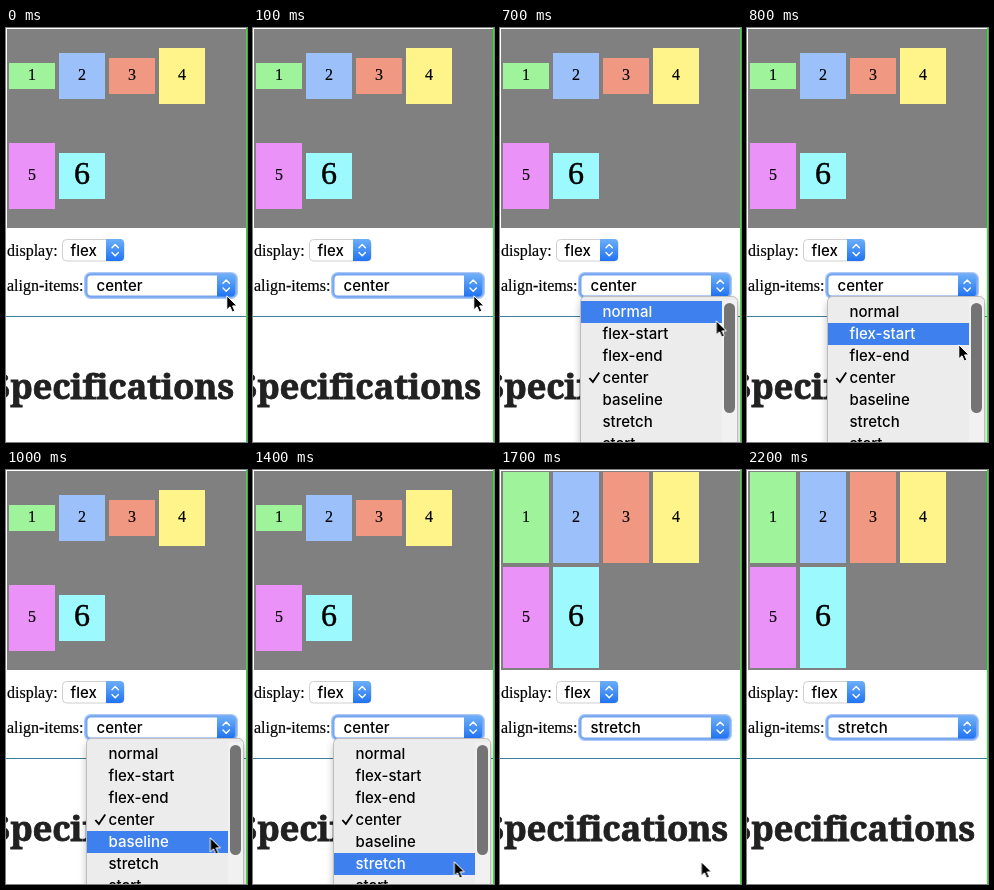
These frames come from a looping animation (241 by 414 pixels, 2700 ms). An HTML page:

```html
<!DOCTYPE html>
<html lang="en">
<head>
<meta charset="utf-8">
<title>align-items demo</title>
<style>
html, body { margin: 0; width: 100%; height: 100%; overflow: hidden; background: #fff; }
svg { display: block; }
.serif { font: 16px "Liberation Serif", serif; stroke: #000; stroke-width: .2; }
.ui { font: 500 15px Inter, sans-serif; }
.num { text-anchor: middle; }
.big { font-size: 32px; stroke-width: .5; }
.title { font: 700 35px "Noto Serif", serif; letter-spacing: -.3px; text-anchor: end; fill: #212121; stroke: #212121; stroke-width: .8; }

.before, .after, .menu, .thin, .wide, .cursor, .pick { animation: 2.7s step-end infinite; }
.before { animation-name: before; }
.after { animation-name: after; }
.menu { animation-name: menu; }
.thin { animation-name: thin; }
.wide { animation-name: wide; }
.cursor { animation-name: cursor; }
.pick { animation-name: pick; }

@keyframes before { 0% { opacity: 1 } 62.9%, 100% { opacity: 0 } }
@keyframes after { 0% { opacity: 0 } 62.9%, 100% { opacity: 1 } }
@keyframes menu {
  0% { opacity: 0 }
  11.1% { opacity: 1 }
  55.5% { opacity: .7 }
  59.2% { opacity: .3 }
  62.9%, 100% { opacity: 0 }
}
@keyframes thin { 0% { opacity: 1 } 25.9%, 100% { opacity: 0 } }
@keyframes wide { 0% { opacity: 0 } 25.9%, 100% { opacity: 1 } }
@keyframes cursor {
  0% { transform: translate(220px, 267px) }
  25.9% { transform: translate(215.5px, 292px) }
  29.6% { transform: translate(211px, 316px) }
  33.3% { transform: translate(207px, 344px) }
  37% { transform: translate(203.5px, 367px) }
  40.7% { transform: translate(201px, 385px) }
  44.4% { transform: translate(200.5px, 391px) }
  77.7% { transform: translate(200.5px, 398px) }
  81.4%, 100% { transform: translate(200.5px, 430px) }
}
/* Highlighted row, 22px per step; it blinks once when chosen. */
@keyframes pick {
  0% { transform: translateY(66px) }
  25.9% { transform: translateY(0) }
  29.6% { transform: translateY(22px) }
  33.3% { transform: translateY(66px) }
  37% { transform: translateY(88px) }
  40.7% { transform: translateY(110px) }
  48.1% { transform: translateY(300px) }
  51.8%, 100% { transform: translateY(110px) }
}
</style>
</head>
<body>
<svg width="241" height="414" viewBox="0 0 241 414">
  <defs>
    <linearGradient id="blue" x2="0" y2="1">
      <stop stop-color="#6caff8"/>
      <stop offset="1" stop-color="#2173f2"/>
    </linearGradient>
    <filter id="soft" x="-20%" y="-20%" width="140%" height="140%">
      <feGaussianBlur stdDeviation="4"/>
    </filter>
    <clipPath id="row"><rect class="pick" x="81" y="273" width="157" height="22"/></clipPath>
    <g id="cap">
      <path d="M0 0h14a4 4 0 0 1 4 4v14a4 4 0 0 1-4 4h-14z" fill="url(#blue)"/>
      <path d="M6 8.7l3.2-3.2 3.2 3.2M6 13.5l3.2 3.2 3.2-3.2" fill="none" stroke="#fff" stroke-width="1.4" stroke-linecap="round" stroke-linejoin="round"/>
    </g>
    <g id="labels" class="ui">
      <text x="102.5" y="289">normal</text>
      <text x="102.5" y="311">flex-start</text>
      <text x="102.5" y="333">flex-end</text>
      <text x="102.5" y="355">center</text>
      <text x="102.5" y="377">baseline</text>
      <text x="102.5" y="399">stretch</text>
      <text x="102.5" y="421">start</text>
      <path d="M88.6 350.6l1.5-1.1 2.7 3.1 5.7-8.6 1.5 1-7 10.5z"/>
    </g>
  </defs>

  <rect width="241" height="414" fill="#fff"/>
  <rect x="1" y="1" width="239" height="199" fill="#808080"/>
  <g class="before">
    <rect x="3" y="35" width="46" height="26" fill="#9ff49b"/>
    <rect x="53" y="25" width="46" height="46" fill="#9cc0f9"/>
    <rect x="103" y="30" width="46" height="36" fill="#f19883"/>
    <rect x="153" y="20" width="46" height="56" fill="#fff48a"/>
    <rect x="3" y="115" width="46" height="66" fill="#ea92f8"/>
    <rect x="53" y="125" width="46" height="46" fill="#9cf9fd"/>
  </g>
  <g class="after">
    <rect x="3" y="2" width="46" height="91" fill="#9ff49b"/>
    <rect x="53" y="2" width="46" height="91" fill="#9cc0f9"/>
    <rect x="103" y="2" width="46" height="91" fill="#f19883"/>
    <rect x="153" y="2" width="46" height="91" fill="#fff48a"/>
    <rect x="3" y="97" width="46" height="101" fill="#ea92f8"/>
    <rect x="53" y="97" width="46" height="101" fill="#9cf9fd"/>
  </g>
  <g class="serif num">
    <text x="26" y="52">1</text>
    <text x="76" y="52">2</text>
    <text x="126" y="52">3</text>
    <text x="176" y="52">4</text>
    <text x="26" y="152">5</text>
    <text class="big" x="76" y="155.5">6</text>
  </g>

  <g class="serif">
    <text x="1" y="228">display:</text>
    <text x="1" y="263">align-items:</text>
  </g>
  <rect x="56.5" y="211.5" width="61.5" height="21.5" rx="4" fill="#fff" stroke="#cfcfcf"/>
  <use href="#cap" x="100" y="211"/>
  <text class="ui" x="64.5" y="228">flex</text>

  <rect x="78" y="244" width="154" height="27" rx="6.5" fill="#a9c9f8"/>
  <rect x="79.3" y="245.3" width="151.4" height="24.4" rx="5.5" fill="#76a6f0"/>
  <rect x="81.5" y="247.5" width="147" height="20" rx="3.5" fill="#fff"/>
  <use href="#cap" x="211" y="246.5"/>
  <text class="ui before" x="90.5" y="263">center</text>
  <text class="ui after" x="90.5" y="263">stretch</text>

  <rect y="288" width="240" height="1" fill="#3d7e9a"/>
  <text class="title" x="228" y="371">Specifications</text>

  <g class="menu">
    <rect x="81" y="273" width="157" height="160" rx="5" fill="#000" opacity=".3" filter="url(#soft)"/>
    <rect x="80.5" y="268.5" width="157" height="160" rx="5" fill="#ececec" stroke="#bdbdbd"/>
    <use href="#labels"/>
    <g clip-path="url(#row)">
      <rect x="81" y="269" width="156" height="150" fill="#3d80ee"/>
      <use href="#labels" fill="#fff"/>
    </g>
    <rect class="thin" x="228" y="275" width="7" height="110" rx="3.5" fill="#6c6c6c"/>
    <g class="wide">
      <rect x="222" y="272" width="15" height="150" fill="#f1f1f1"/>
      <rect x="224" y="275" width="11" height="110" rx="5.5" fill="#747474"/>
    </g>
  </g>

  <rect x="240" width="1" height="414" fill="#1df01d"/>
  <path class="cursor" d="M.8 .8v14l3.2-3 2.3 5.2 2.5-1.1-2.2-5h4.4z" fill="#000" stroke="#fff"/>
</svg>
</body>
</html>
```
